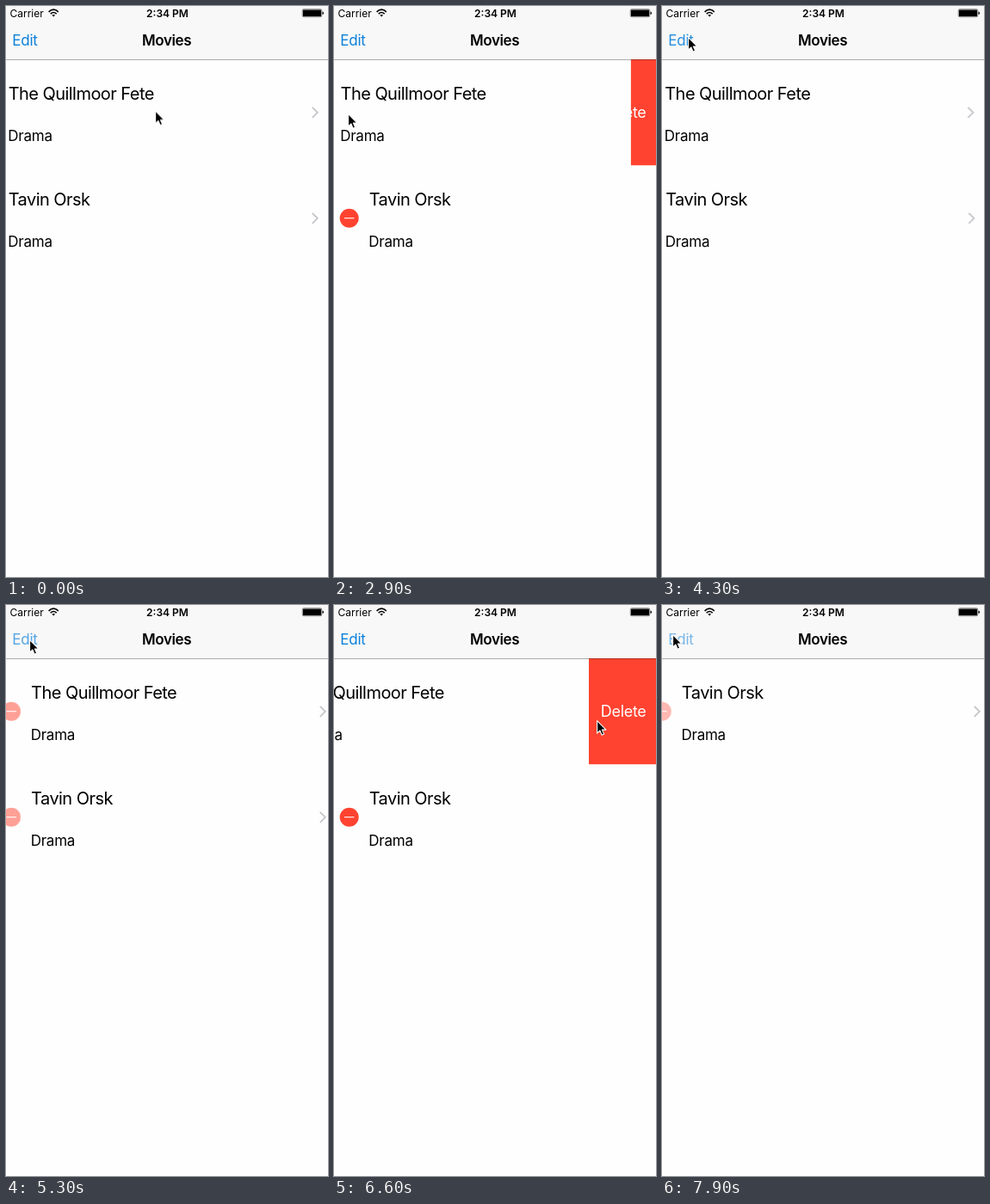
Animation, 374 px wide and 664 px high, one loop 8 s. Source, as an HTML page:

```html
<!DOCTYPE html>
<html lang="en">
<head>
<meta charset="utf-8">
<title>Movies</title>
<style>
  html, body { margin: 0; width: 100%; height: 100%; overflow: hidden; background: #fefefe; }
  svg { display: block; width: 374px; height: 664px; font-family: Inter, Roboto, sans-serif; }
  text { white-space: pre; }
  .title { font-size: 20px; letter-spacing: -.55px; }
  .body { font-size: 17px; letter-spacing: -.25px; }
  .status { font-size: 12px; }
  .bold { font-weight: 600; }
  .heading { font-size: 17px; letter-spacing: -.4px; }
  .button { font-size: 18px; letter-spacing: -.3px; }
  .paper { fill: #fefefe; }
  .red { fill: #ff4330; }

  .slide, .minus, .chevron, .fade, .swipe, .doomed, .rise, .edit, .cursor {
    animation: 8s linear infinite;
  }
  .slide { animation-name: slide; animation-timing-function: ease-in-out; }
  .chevron { animation-name: chevron; animation-timing-function: ease-in-out; }
  .fade { animation-name: fade; }
  .minus { animation-name: minus; }
  .swipe { animation-name: swipe; animation-timing-function: ease; }
  .doomed { animation-name: doomed; }
  .rise { animation-name: rise; animation-timing-function: ease-in-out; }
  .edit { animation-name: edit; }
  .cursor { animation-name: cursor; animation-timing-function: ease-in-out; }

  /* Edit mode pushes the text right and the chevron out. */
  @keyframes slide {
    0%, 21%, 54.375%, 63.563% { transform: translateX(0); }
    25.375%, 50%, 67.938% { transform: translateX(38px); }
    96.688% { transform: translateX(38px); animation-timing-function: cubic-bezier(.42, 0, .7, .75); }
    100% { transform: translateX(3.8px); }
  }
  @keyframes chevron {
    0%, 21%, 54.375%, 63.563% { transform: translateX(0); }
    25.375%, 50%, 67.938% { transform: translateX(13px); }
    96.688% { transform: translateX(13px); animation-timing-function: cubic-bezier(.42, 0, .7, .75); }
    100% { transform: translateX(1.3px); }
  }
  @keyframes fade {
    0%, 24.375%, 51%, 66.938% { opacity: 1; }
    25.375%, 50%, 67.938%, 96.688% { opacity: 0; }
    97.688%, 100% { opacity: 1; }
  }
  @keyframes minus {
    0%, 21.8%, 53.5%, 64.375% { opacity: 0; }
    25.55%, 50%, 68.125%, 96.688% { opacity: 1; }
    100% { opacity: 0; }
  }

  @keyframes swipe {
    0%, 35.03%, 54.375%, 74.375% { transform: translateX(0); }
    40%, 50%, 79.375%, 100% { transform: translateX(-82px); }
  }
  @keyframes doomed {
    0%, 85.625% { opacity: 1; }
    90%, 100% { opacity: 0; }
  }
  @keyframes rise {
    0%, 85.625% { transform: translateY(123px); }
    90%, 100% { transform: translateY(0); }
  }

  @keyframes edit {
    0%, 19.99% { opacity: 1; }
    20%, 21% { opacity: .2; }
    25.375%, 48.74% { opacity: 1; }
    48.75%, 50% { opacity: .2; }
    54.375%, 62.3% { opacity: 1; }
    62.31%, 63.563% { opacity: .2; }
    67.938%, 95.43% { opacity: 1; }
    95.44%, 96.688% { opacity: .2; }
    100% { opacity: .75; }
  }

  @keyframes cursor {
    0%, 3.5% { transform: translate(173px, 121.5px); }
    15%, 25.5% { transform: translate(31px, 37px); }
    32.5%, 38.5% { transform: translate(16px, 125px); }
    45% { transform: translate(34px, 27.5px); }
    47.5%, 57% { transform: translate(30px, 36px); }
    61%, 67% { transform: translate(27px, 40px); }
    72.5%, 76.5% { transform: translate(16px, 124px); }
    82.5% { transform: translate(305px, 134px); }
    84.5%, 86.5% { transform: translate(312px, 127px); }
    95%, 100% { transform: translate(12px, 34px); }
  }
</style>
</head>
<body>
<svg viewBox="0 0 374 664">
  <defs>
    <path id="arrow" d="M355.8 117.8l6 6-6 6" fill="none" stroke="#c4c4c9" stroke-width="1.8"/>
    <g id="remove">
      <circle class="red" cx="-20.3" cy="123.7" r="11"/>
      <path d="M-26 123.7h11.4" stroke="#fff" stroke-width="1.1"/>
    </g>
  </defs>
  <rect class="paper" width="374" height="664"/>

  <!-- first row, with the delete button beneath it -->
  <g class="doomed">
    <rect class="red" x="290" y="62" width="84" height="123.5"/>
    <text class="button" x="309.8" y="130" fill="#fff">Delete</text>
    <g class="swipe">
      <rect class="paper" x="-10" y="62" width="388" height="124"/>
      <g class="slide">
        <text class="title" x="2.7" y="108.5">The Quillmoor Fete</text>
        <text class="body" x="2.3" y="157">Drama</text>
        <g class="minus"><use href="#remove"/></g>
      </g>
      <g class="fade"><use class="chevron" href="#arrow"/></g>
    </g>
  </g>

  <g class="rise">
    <rect class="paper" y="62.5" width="374" height="123"/>
    <g class="slide">
      <text class="title" x="2.7" y="108.5">Tavin Orsk</text>
      <text class="body" x="2.3" y="157">Drama</text>
      <g class="minus"><use href="#remove"/></g>
    </g>
    <g class="fade"><use class="chevron" href="#arrow"/></g>
  </g>

  <!-- status and navigation bars -->
  <rect width="374" height="62" fill="#f8f8f8"/>
  <path d="M0 62.5h374" stroke="#000" stroke-opacity=".32"/>
  <text class="status" x="4.5" y="12.5">Carrier</text>
  <g fill="none" stroke="#000" stroke-width="1.6">
    <path d="M49.6 6.8q5.6-5.2 11.2 0M51.7 9.1q3.5-3.2 7 0"/>
    <path d="M53.3 10.6q1.9-1.4 3.8 0l-1.9 1.9z" fill="#000" stroke="none"/>
  </g>
  <text class="status bold" x="187.5" y="12.5" text-anchor="middle">2:34 PM</text>
  <rect x="344.25" y="3.75" width="22.5" height="9" rx="1.5" fill="none" stroke="#000" stroke-width=".5"/>
  <rect x="345" y="4.5" width="21" height="7.5" rx=".6"/>
  <path d="M367.5 6.6q1.5.2 1.5 1.7t-1.5 1.7z"/>
  <text class="body edit" x="7.3" y="46" fill="#0b80da">Edit</text>
  <text class="heading bold" x="186.6" y="46" text-anchor="middle">Movies</text>

  <g class="cursor">
    <path d="M.6.6v14.6l3.3-3.2 2.2 5.2 2.5-1.1-2.2-5h4.5z" stroke="#fff" stroke-width="1.1" stroke-linejoin="round"/>
  </g>
</svg>
</body>
</html>
```
